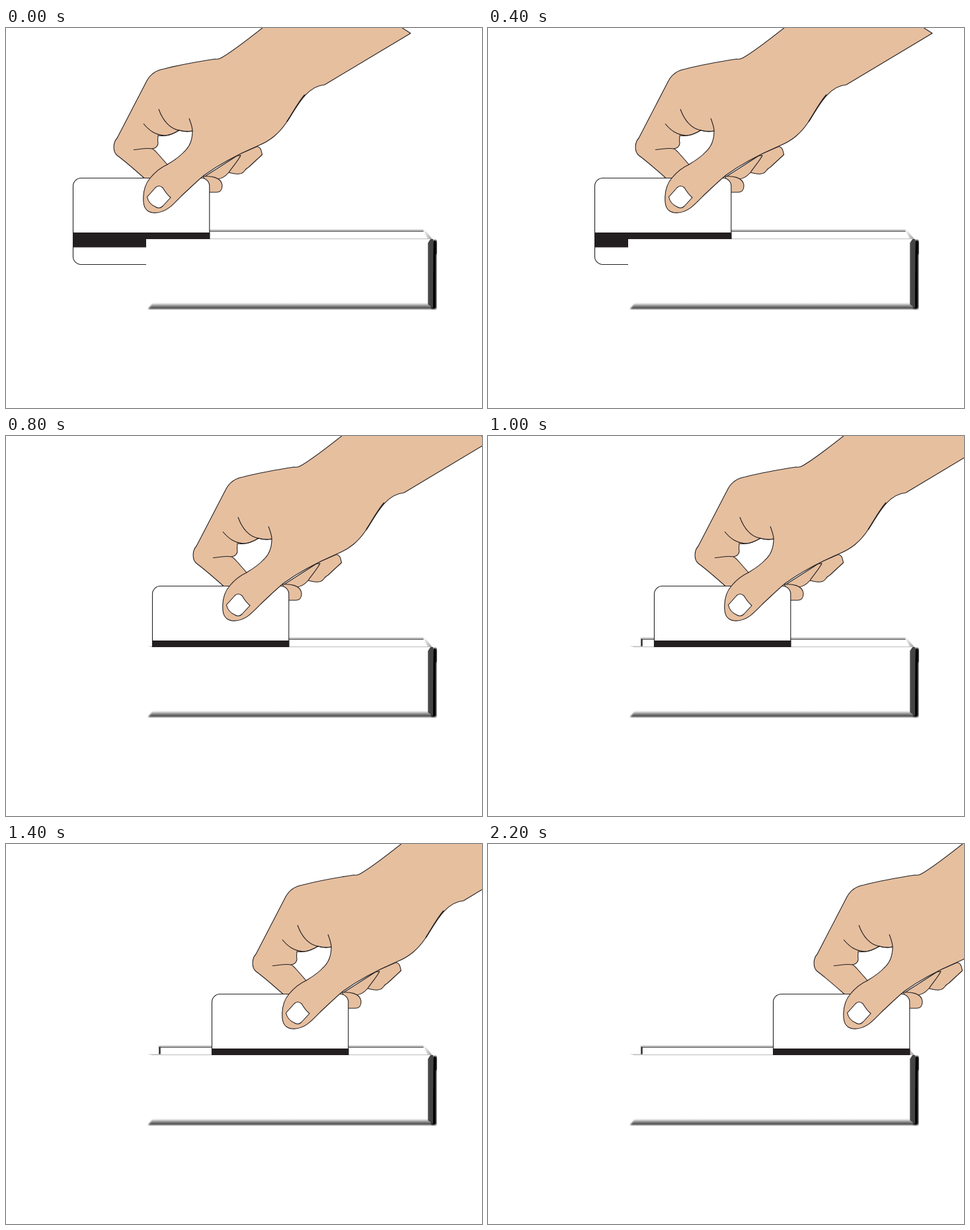
Recreate the animation shown at these times as an HTML page. Size 720 px wide and 576 px high, loop 2.3 s.

```html
<!DOCTYPE html>
<html lang="en">
<head>
<meta charset="utf-8">
<title>Card swipe</title>
<style>
html, body { margin: 0; width: 100%; height: 100%; overflow: hidden; background: #fff; }
svg { display: block; width: 720px; height: 576px; }
.skin { fill: #e6bf9f; }
.line { stroke: #231f20; stroke-width: 1.1; stroke-linejoin: round; }
</style>
</head>
<body>
<svg viewBox="0 0 720 576">
  <defs>
    <filter id="soft" x="-20%" y="-20%" width="140%" height="140%"><feGaussianBlur stdDeviation=".9"/></filter>
    <linearGradient id="down" x2="0" y2="1">
      <stop stop-color="#fff"/><stop offset=".3" stop-color="#aaa"/>
      <stop offset=".75" stop-color="#555"/><stop offset="1" stop-color="#333"/>
    </linearGradient>
    <linearGradient id="slant">
      <stop stop-color="#fff"/><stop offset="1" stop-color="#999"/>
    </linearGradient>
    <linearGradient id="side">
      <stop stop-color="#777"/><stop offset=".25" stop-color="#444"/><stop offset="1" stop-color="#444"/>
    </linearGradient>
    <clipPath id="slot"><path d="M0 0H720V320H212V576H0z"/></clipPath>
  </defs>

  <!-- reader -->
  <path d="M231 306H632V308H231z" fill="#999" filter="url(#soft)"/>
  <path d="M233 308.2H632" stroke="#444"/>
  <path d="M232.5 307.5V320" stroke="#333" stroke-width="2.6"/>
  <path d="M631 307L635 308L645 320H638z" fill="url(#slant)"/>
  <path d="M214 318.5L222 320H234V318.5z" fill="#bbb"/>
  <path d="M220 319.6H643" stroke="#bbb"/>
  <path d="M222 417H640L650 426H215z" fill="url(#down)" filter="url(#soft)"/>
  <path d="M646 322H650.5V425H644z" fill="#000" stroke="#000" filter="url(#soft)"/>
  <path d="M649 323H651.5V343H649z" fill="#000" filter="url(#soft)"/>
  <path d="M638 326L642 320H646V424L638 419z" fill="url(#side)"/>

  <g clip-path="url(#slot)"><g id="swipe">
    <g class="skin line">
      <path d="M380 179.500C386 181 386 186 387.500 192L367 211C360 214 361 221 353 221C346 222 341 220 337 219L320 215L349 193z"/>
      <path d="M349 194L355 193C352 200 343 210 337 219C331 226 325 229 318 229L299 226z"/>
      <path d="M298 225C310 224 325 226 327 238C327 245 325 249 318 249L300 249V228z"/>
    </g>
    <rect class="line" x="101.500" y="227.500" width="206.300" height="131" rx="12" fill="#fff"/>
    <path d="M101 310H308.300V332.500H101z" fill="#231f20"/>
    <path class="skin line" fill-rule="evenodd" d="M389 -1C360 22 342 36 326 45Q321 48 316 47C290 51 262 56 239 62C227 64 219 69 213 80L168 167C162 173 161 187 168 193C180 202 195 215 209 227.500H218C209 238 207 250 208 264C209 277 218 281 228 280C245 278 255 265 267 253C280 241 290 231 300 223C325 205 352 191 380 179C400 171 413 160 425 142C440 119 455 88 482 86L612 8L598 -1z
      M230 163C243 165 254 160 262 155C270 157 276 157 282 156C282 171 277 181 269 188C262 196 252 202 244 207L230 191Q224 184 221 183C229 182 231 176 229.500 171z"/>
    <g class="line" fill="none">
      <path d="M208 145C217 156 226 162 240 163C250 163 256 158 262 155"/>
      <path d="M231 123C237 140 248 153 262 155C270 158 277 157 282 156C282 150 280 145 277 137"/>
      <path d="M193 184.500C202 184 213 181 221 183"/>
      <path d="M244 207C235 211 225 219 218 227.500"/>
      <path d="M425 142C433 130 441 114 452 101" stroke-width="1.700"/>
    </g>
    <path class="line" fill="#fff" d="M213.500 256L226 242Q231 237 237 242C240 247 244 253 249 257L237 270Q232 275 226 271C219 268 215 263 213.500 256z"/>
  </g></g>
</svg>
<script>
const LOOP = 2300, TICK = 100, STEP = 15;
const swipe = document.getElementById("swipe");

function draw() {
  const tick = Math.floor(performance.now() % LOOP / TICK);
  swipe.setAttribute("transform", `translate(${tick * STEP} 0)`);
  requestAnimationFrame(draw);
}
draw();
</script>
</body>
</html>
```
